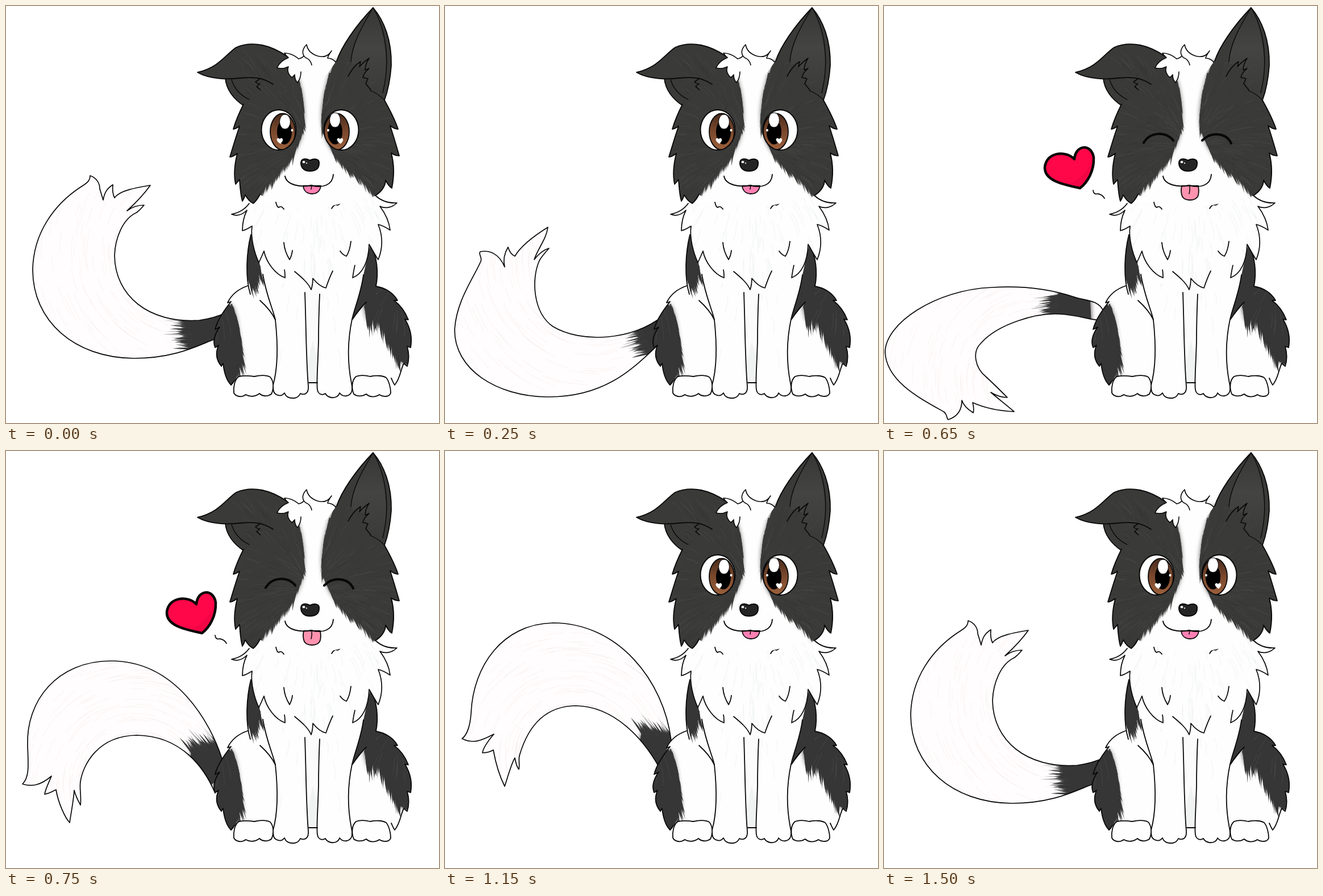
An HTML page with a canvas for the animation above (1750 ms loop, 762 by 735 pixels).

```html
<!DOCTYPE html>
<html lang="en">
<head>
<meta charset="utf-8">
<title>Happy dog</title>
<style>
html, body { margin: 0; width: 100%; height: 100%; overflow: hidden; background: #fff; }
canvas { display: block; }
</style>
</head>
<body>
<canvas id="stage" width="762" height="735"></canvas>
<script>
const ctx = document.getElementById('stage').getContext('2d');
const INK = '#080808', DARK = '#3a3a39', COAT = '#353635', WHITE = '#fdfefd';
const STEP = 250, ORDER = [0, 1, 2, 3, 4, 5, 0];

let seed = 1;
const rnd = () => (seed = seed * 16807 % 2147483647) / 2147483647;

function shape(d, fill, line, width = 1.8) {
  const p = new Path2D(d);
  if (fill) { ctx.fillStyle = fill; ctx.fill(p); }
  if (line) { ctx.strokeStyle = line; ctx.lineWidth = width; ctx.stroke(p); }
}
const ink = (d, width) => shape(d, null, INK, width);

function soft(d, fill, blur) {
  ctx.shadowColor = fill;
  ctx.shadowBlur = blur;
  shape(d, fill);
  ctx.shadowBlur = 0;
}

function oval(x, y, rx, ry, fill, line, width = 1.8) {
  ctx.beginPath();
  ctx.ellipse(x, y, rx, ry, 0, 0, 7);
  ctx.fillStyle = fill;
  ctx.fill();
  if (line) { ctx.strokeStyle = line; ctx.lineWidth = width; ctx.stroke(); }
}

function clipped(d, draw) {
  ctx.save();
  ctx.clip(new Path2D(d));
  draw();
  ctx.restore();
}

// Tapered hairs rooted along a polyline, all leaning the same way
function fuzz(pts, dx, dy, len, n, color = COAT) {
  ctx.fillStyle = color;
  for (let i = 0; i < n; i++) {
    const t = (i + rnd()) / n * (pts.length - 1), k = Math.floor(t), f = t - k;
    const [a, b] = [pts[k], pts[k + 1]];
    const x = a[0] + (b[0] - a[0]) * f, y = a[1] + (b[1] - a[1]) * f;
    const l = len * (0.35 + 0.65 * rnd()), w = 1 + rnd() * 1.2, lean = (rnd() - 0.5) * 0.25;
    const tx = x + (dx - dy * lean) * l, ty = y + (dy + dx * lean) * l;
    ctx.beginPath();
    ctx.moveTo(x - dx * 5 - dy * w, y - dy * 5 + dx * w);
    ctx.quadraticCurveTo(x + dx * l * 0.5 - dy * w, y + dy * l * 0.5 + dx * w, tx, ty);
    ctx.lineTo(x - dx * 5 + dy * w, y - dy * 5 - dx * w);
    ctx.fill();
  }
}

// Faint strands: radial around a centre, or circling it
function strands(cx, cy, r0, r1, n, color, circling) {
  ctx.strokeStyle = color;
  ctx.lineWidth = 1.3;
  for (let i = 0; i < n; i++) {
    const a = rnd() * 6.283, r = r0 + (r1 - r0) * rnd(), l = 12 + rnd() * 26;
    ctx.beginPath();
    if (circling) ctx.arc(cx, cy, r, a, a + l * 1.5 / r);
    else {
      const c = Math.cos(a), s = Math.sin(a);
      ctx.moveTo(cx + c * r, cy + s * r);
      ctx.quadraticCurveTo(cx + c * (r + l / 2) + 3, cy + s * (r + l / 2), cx + c * (r + l), cy + s * (r + l) + 5);
    }
    ctx.stroke();
  }
}

// d: outline, a-b: where the dark base begins, dir: hair direction, c: centre of the curl
const TAILS = [
  { d: 'M368 587C340 597 300 621 225 621C120 620 47 555 47 465C48 400 85 350 130 320C143 312 148 308 148 299C160 303 165 313 165 322L171 342C173 330 177 322 188 315C187 325 188 332 191 338C200 325 230 320 254 316C240 336 225 350 213 361C222 354 232 351 243 351C238 357 235 360 230 364C205 375 192 410 191 440C192 510 250 560 340 554C360 551 374 547 386 541',
    a: [318, 553], b: [326, 604], dir: [-1, -.06], c: [320, 430] },
  { d: 'M372 600C330 640 280 690 180 689C90 688 16 640 17 570C20 520 50 480 63 450C66 443 58 437 62 433C78 430 95 436 105 460C102 448 105 435 111 425C113 432 116 438 123 441C135 420 165 400 181 390C178 412 164 426 157 447C164 438 172 430 183 427C175 436 169 443 166 449C152 480 154 540 190 565C240 595 330 590 384 546',
    a: [344, 570], b: [360, 612], dir: [-.98, .2], c: [265, 450] },
  { d: 'M386 538C378 517 350 519 335 513C290 498 240 493 190 496C90 500 2 560 2 610C4 660 60 690 105 715C112 720 110 728 113 729C126 725 137 715 137 695C140 705 149 712 157 717C159 709 157 704 156 699C180 710 210 714 229 715C214 702 202 693 188 681C198 687 207 690 217 690C205 678 192 665 180 654C160 638 155 610 170 595C200 560 270 540 310 543C345 545 365 555 386 554',
    a: [304, 510], b: [302, 545], dir: [-1, .08], c: [275, 660] },
  { d: 'M380 542C360 480 300 370 185 370C90 370 35 440 38 520C39 550 42 575 29 587C45 592 60 590 80 573C75 585 69 597 68 605C76 604 82 600 88 597C92 620 103 645 112 655C115 635 119 615 120 598C123 610 128 618 131 624C133 610 129 595 131 583C135 555 160 502 230 501C310 502 350 560 368 603',
    a: [376, 520], b: [326, 530], dir: [-.6, -.8], c: [230, 590] },
  { d: 'M398 510C385 405 305 303 190 303C100 305 50 380 46 460C45 480 40 500 30 507C50 517 65 510 86 499C75 512 67 523 66 532C75 532 80 530 85 527C90 555 97 575 105 591C112 570 117 550 123 541C125 552 127 558 130 561C132 553 129 545 131 537C136 520 155 450 230 449C300 450 350 510 376 556',
    a: [402, 506], b: [346, 496], dir: [-.55, -.84], c: [225, 540] },
  { d: 'M374 577C350 572 300 570 240 535C180 500 150 440 151 370C155 290 220 230 320 229C335 228 343 228 350 216C358 225 357 248 343 268C354 264 360 252 376 250C372 258 368 265 366 272C382 268 395 274 410 276L410 300L370 307C382 304 390 307 399 313C340 315 288 360 288 410C288 470 320 520 382 542',
    a: [330, 512], b: [322, 560], dir: [-.9, -.43], c: [405, 410] }
];

function drawTail({ d, a, b, dir: [dx, dy], c }) {
  shape(d, '#fffdfd');
  clipped(d, () => {
    strands(...c, 90, 300, 420, 'rgba(190,150,150,.07)', true);
    // The base fans out so that it fills the tail down to the root
    const side = Math.sign((a[0] - b[0]) * dy - (a[1] - b[1]) * dx);
    const root = ([x, y], s) => [x - dx * 60 + dy * 60 * s, y - dy * 60 - dx * 60 * s];
    soft(`M${a}L${b}L${root(b, -side)}L${root(a, side)}Z`, COAT, 8);
    fuzz([a, b], dx, dy, 34, 40);
    fuzz([a, b], dx, dy, 50, 12, 'rgba(60,60,60,.35)');
  });
  ink(d, 1.7);
}

const HAUNCH_L = 'M426 493C408 499 396 510 390 523C392 523 394 522 396 521C384 536 372 553 368 570C371 569 373 568 376 566C366 580 364 592 368 602C370 601 372 600 374 598C368 612 370 624 379 635C380 633 381 632 382 630C384 648 388 660 396 668C398 666 400 664 402 660';
const HAUNCH_R = 'M651 494C668 497 682 506 689 519L683 519C695 528 703 540 708 553L702 552C712 568 715 586 712 602L706 600C710 614 709 626 706 635L700 630C694 642 694 656 684 668C681 664 680 660 678 656';
const LEG_L = 'M452 473C458 510 470 535 474 553C479 600 478 640 470 668C470 678 471 683 476 685C482 688 487 686 490 682C493 690 500 692 508 691C513 690 516 688 518 683C526 687 533 682 532 670C528 620 528 560 526 505';
const LEG_R = 'M629 474C625 505 614 530 609 552C601 590 601 630 608 665C611 678 608 685 600 687C595 688 590 686 587 682C585 689 578 691 572 690C567 689 564 687 562 683C556 687 549 684 548 676C546 665 549 630 550 590C550 560 551 530 552 508';
const FOOT_L = 'M410 653C420 651 430 652 437 653C446 651 457 650 465 654C472 662 471 676 467 684C460 689 451 688 446 683C440 688 430 690 422 685C414 691 404 688 401 682C400 672 402 658 410 653Z';
const FOOT_R = 'M616 653C624 650 633 651 641 653C650 651 662 651 669 655C674 661 677 673 677 682C675 689 664 690 657 685C650 690 640 690 634 684C626 689 617 688 612 684C608 674 608 660 616 653Z';
const RUFF_L = 'M428 348C420 359 408 365 397 367C407 371 416 368 424 360C418 372 416 384 416 396C422 395 428 391 433 388C430 408 437 435 445 452C448 446 451 439 454 432C458 452 474 473 491 479C491 474 491 470 490 465';
const RUFF_M = 'M508 468C520 478 532 488 537 500C539 494 540 487 540 480C547 489 555 495 563 497C566 488 570 477 575 467';
const RUFF_R = 'M614 457C612 465 611 472 610 479C628 472 638 450 639 420C645 430 650 440 655 447C664 425 663 405 655 385C663 387 670 391 676 395C674 378 667 365 658 353C668 358 680 355 688 347C675 348 662 345 650 334';

function drawBody() {
  const left = HAUNCH_L + 'L475 660L475 500Z', right = HAUNCH_R + 'L605 660L610 550L640 500Z';
  shape(left, WHITE);
  shape(right, WHITE);
  clipped(left, () => {
    soft('M388 523L398 530C409 555 409 595 416 625L408 645L402 668L350 680L350 520Z', COAT, 8);
    fuzz([[398, 530], [408, 560], [410, 595], [415, 622], [405, 645]], .28, .96, 30, 55);
    strands(370, 480, 20, 180, 110, 'rgba(255,255,255,.05)');
  });
  clipped(right, () => {
    soft('M651 480L630 530L637 555L654 550L672 585L692 625L720 640L720 480Z', COAT, 8);
    fuzz([[633, 535], [639, 555], [654, 550], [670, 580], [686, 612], [694, 622]], .05, 1, 32, 60);
    strands(690, 480, 20, 160, 110, 'rgba(255,255,255,.05)');
  });
  shape('M431 403L425 493L452 520L474 553L610 552L634 522L651 494L641 420Z', WHITE);
  ink(HAUNCH_L);
  ink(HAUNCH_R);

  shape('M431 403C423 435 421 470 428 490L438 484L449 468L440 420Z', COAT);
  fuzz([[429, 486], [437, 480], [448, 462]], .2, .98, 32, 24);
  shape('M641 420C653 440 656 470 651 494L650 540L634 522L610 552C616 520 624 500 629 474Z', COAT);
  ink('M431 403C423 435 421 480 430 508M641 420C653 440 656 470 651 494');

  shape('M526 500L552 500L549 664L532 664Z', '#fafbfa');
  shape('M540 590Q530 625 533 663L548 663Q549 625 540 590Z', '#f0f3f1');
  shape(LEG_L + 'L540 470Z', WHITE);
  shape(LEG_R + 'L540 470Z', WHITE);
  for (const d of [LEG_L, LEG_R]) clipped(d, () => strands(540, 300, 170, 380, 230, 'rgba(90,120,100,.05)'));
  ink(LEG_L);
  ink(LEG_R);
  ink('M533 664H548M447 519Q466 536 474 553M634 522Q620 536 610 552');
  shape(FOOT_L, WHITE, INK);
  shape(FOOT_R, WHITE, INK);

  const ruff = RUFF_L + RUFF_M.replace('M', 'L') + RUFF_R.replace('M', 'L') + 'Z';
  shape(ruff, WHITE);
  clipped(ruff, () => strands(540, 230, 60, 250, 420, 'rgba(90,120,100,.05)'));
  [RUFF_L, RUFF_M, RUFF_R].forEach(d => ink(d, 1.7));
  ink('M475 346Q477 355 480 355Q484 351 489 358M590 345Q585 353 581 350Q577 350 573 357M489 417C490 432 496 442 499 447Q503 440 504 431M607 415Q605 432 599 441Q593 439 588 432');
}

const HEAD_L = 'M418 173C412 185 404 203 400 217C404 217 408 214 411 212C404 232 399 250 394 266C399 266 404 262 407 260C402 280 401 300 404 314C407 311 409 308 411 306C412 322 413 334 416 344C419 340 420 336 421 333C425 340 429 345 435 348C440 344 444 338 447 332';
const HEAD_R = 'M666 166C676 184 685 202 690 217C685 217 680 214 676 211C683 232 688 250 692 264C687 264 682 262 678 259C684 282 683 302 679 321C674 318 671 313 668 307C668 318 660 328 650 334';
const EAR_L = 'M470 138C450 125 435 125 412 127C390 130 358 129 337 117C375 108 385 87 405 73C435 60 468 70 495 89';
const EAR_R = 'M582 97C590 72 615 35 646 3C665 25 679 60 678 105C676 132 672 150 666 166';

function drawHead() {
  shape('M490 95L582 95L650 334L540 360L447 335Z', WHITE);

  const left = HEAD_L + 'C458 314 476 297 491 278C509 256 521 235 523 208C525 178 521 150 512 124L495 88L430 100Z';
  const right = HEAD_R + 'C630 308 602 286 581 262C563 240 556 215 557 185C559 160 565 135 578 97L640 100Z';
  shape('M386 128C388 148 402 165 420 177L460 150L440 122Z', DARK, INK);
  clipped(HEAD_L + 'L470 350L545 350L545 60L430 100Z', () => {
    soft(left, DARK, 9);
    fuzz([[511, 122], [519, 150], [523, 185], [522, 215]], .14, .99, 22, 45, DARK);
    fuzz([[521, 220], [508, 255], [489, 279], [467, 302], [448, 322]], -.25, .97, 28, 75, DARK);
  });
  clipped(HEAD_R + 'L630 350L536 350L536 60L640 100Z', () => {
    soft(right, DARK, 9);
    fuzz([[570, 122], [561, 158], [558, 188], [559, 218]], -.14, .99, 22, 45, DARK);
    fuzz([[559, 220], [578, 258], [600, 282], [630, 307], [648, 326]], .3, .95, 26, 75, DARK);
  });

  shape(EAR_L + 'L510 130Z', DARK);
  shape(EAR_R + 'L620 180L570 140Z', DARK);
  const inner = ctx.createLinearGradient(0, 10, 0, 150);
  inner.addColorStop(0, '#383837');
  inner.addColorStop(.45, '#444443');
  inner.addColorStop(1, '#3b3b3a');
  shape('M646 6C625 40 609 70 607 100L630 110L640 148L664 160C675 110 668 50 646 6Z', inner);
  for (const d of [left, right, EAR_L]) {
    clipped(d, () => {
      strands(540, 250, 20, 190, 380, 'rgba(255,255,255,.035)');
      strands(540, 250, 20, 190, 260, 'rgba(0,0,0,.07)');
    });
  }
  ink(HEAD_L);
  ink(HEAD_R);
  ink(EAR_L);
  ink(EAR_R);
  ink('M646 3C624 40 609 68 607 98M646 3C668 40 677 95 663 153M397 130Q404 153 428 165M641 149Q655 154 666 166', 1.3);
  ink('M447 128L439 134Q443 138 447 137L441 142Q445 145 448 148M602 124Q611 106 624 98L622 107Q630 98 639 92Q632 103 632 113L639 110Q629 119 628 126L637 128L633 137L642 148', 1.6);

  const tuft = 'M515 93Q503 83 490 83Q493 88 497 91C487 95 480 102 477 109Q487 112 497 107C494 115 498 122 503 126Q506 124 508 121C508 127 510 132 513 135Q519 127 519 116';
  const crest = 'M515 93Q521 92 524 88M538 104Q536 94 527 91C520 85 521 76 529 68C531 80 539 85 548 88C558 91 567 89 573 79Q567 87 566 92Q575 92 580 99';
  shape(tuft + 'L540 130L565 120L580 99L566 92L573 80Q560 92 548 89Q532 80 529 68Q520 80 524 89Z', WHITE);
  ink(tuft, 1.6);
  ink(crest, 1.6);

  shape('M519 277C519 268 528 268 535 272C543 268 552 269 551 278C551 288 543 291 535 291C526 291 519 286 519 277Z', '#242424', INK, 2);
  oval(524, 275, 2.5, 2, '#fff');
  oval(529, 277, 1.2, 1.2, '#ddd');
}

const tinyHeart = (x, y) =>
  shape(`M${x} ${y - 2}c-2 -4 -7 -1 -5 2c1 3 4 4 6 6c2 -3 5 -5 4 -8c-1 -3 -4 -3 -5 0Z`, '#fff');

function drawEye(x, irisX, pupilX, shineX, shineY, heartX, dotX) {
  const brown = ctx.createLinearGradient(0, 190, 0, 252);
  brown.addColorStop(0, '#4a2c1c');
  brown.addColorStop(.5, '#7a482d');
  brown.addColorStop(1, '#9a5f3b');
  const ball = new Path2D();
  ball.ellipse(x, 218.5, 30.5, 35.5, 0, 0, 7);
  ctx.fillStyle = '#fff';
  ctx.fill(ball);
  ctx.save();
  ctx.clip(ball);
  oval(irisX, 221.5, 22, 32, brown, INK);
  oval(pupilX, 222, 13, 22, '#000');
  ctx.restore();
  oval(shineX, shineY, 9.5, 13, '#fff', INK, 1);
  tinyHeart(heartX, 237);
  oval(dotX, 219, 2, 2.2, '#fff');
  ctx.strokeStyle = INK;
  ctx.lineWidth = 2;
  ctx.stroke(ball);
}

function drawFace(happy) {
  if (happy) {
    ink('M457 241C468 222 496 220 509 237M560 237C576 221 602 223 611 242', 4.2);
    shape('M524 317C522 325 523 331 525 336C530 344 547 344 552 336C555 330 554 323 553 317Z', '#ff92ae', INK);
    ink('M538 317Q539 324 537 331', 1.5);
  } else {
    drawEye(480, 487, 490, 491, 204, 482, 503.5);
    drawEye(590, 582, 579, 579, 201, 588, 567);
    shape('M523 317C524 327 531 331 539 331C547 331 553 326 554 317Z', '#ff80b3', INK);
    ink('M538 316L537 323', 1.5);
  }
  ink('M491 300C494 316 519 320 537 316C558 322 575 315 576 297', 1.9);
}

function drawHeart() {
  const d = 'M335 270C320 254 286 257 283 284C282 309 318 315 345 321C358 311 370 291 369 267C365 242 337 244 335 270Z';
  shape(d, '#ff0748');
  clipped(d, () => shape('M369 260Q362 300 320 316L350 325L378 290Z', 'rgba(200,0,60,.22)'));
  ink(d, 4.5);
  ink('M368 325Q369 333 376 331Q384 332 388 339');
}

function draw(pose) {
  seed = 77;
  const happy = pose === 2 || pose === 3;
  ctx.fillStyle = '#fff';
  ctx.fillRect(0, 0, 762, 735);
  drawTail(TAILS[pose]);
  seed = 4242;
  drawBody();
  drawHead();
  drawFace(happy);
  if (happy) drawHeart();
}

ctx.lineCap = ctx.lineJoin = 'round';
let shown = -1;
function tick() {
  const pose = ORDER[Math.floor(performance.now() / STEP) % ORDER.length];
  if (pose !== shown) draw(shown = pose);
  requestAnimationFrame(tick);
}
tick();
</script>
</body>
</html>
```
